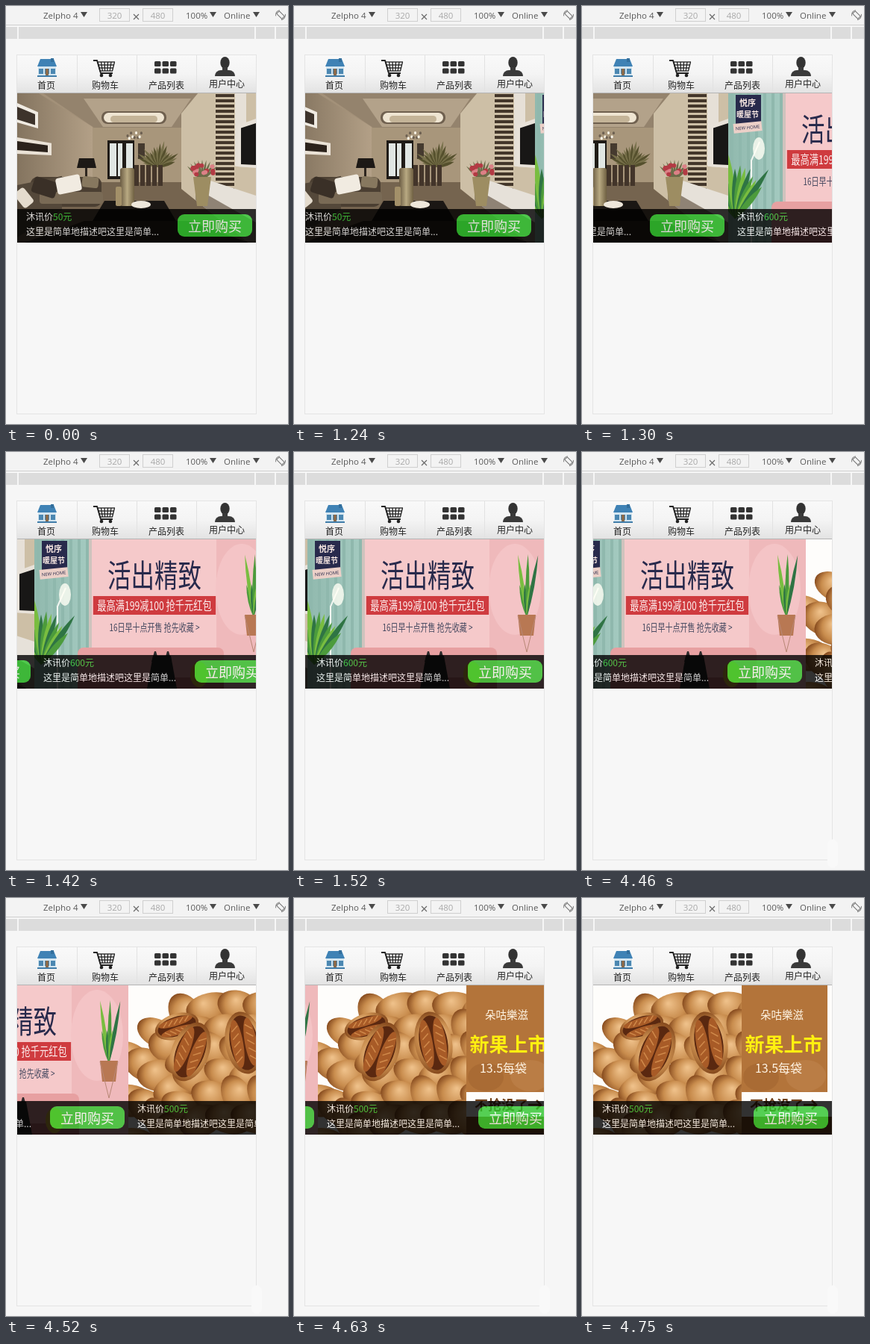
These frames come from a looping animation (378 px wide and 560 px high, 5.29 s). An HTML page with a canvas:

```html
<!DOCTYPE html>
<html lang="zh">
<head>
<meta charset="utf-8">
<title>Shop carousel</title>
<style>
html, body { margin: 0; width: 100%; height: 100%; overflow: hidden; background: #f6f6f6; }
body { position: relative; font: 12px/20px "Noto Sans CJK SC", "Noto Sans CJK", sans-serif; }
#page { position: absolute; left: 0; top: 0; }
#view { position: absolute; left: 15px; top: 117px; width: 320px; height: 200px; overflow: hidden; }
#strip { position: absolute; left: 0; top: 0; width: 960px; height: 200px; }
#strip canvas { position: absolute; left: 0; top: 0; }
.cap { position: absolute; top: 155px; width: 320px; height: 45px; background: #000; color: #fff; opacity: .8; white-space: nowrap; }
.cap p { margin: 0 0 0 12px; height: 20px; }
.cap b { font-weight: 400; color: #32cd32; }
.cap span { position: absolute; left: 215px; top: 7px; width: 100px; height: 30px; border-radius: 9px; background: #2bc42b; font-size: 18px; line-height: 30px; text-align: center; }
#glow { position: absolute; left: 329px; top: 519px; width: 14px; height: 38px; border-radius: 7px; background: #f9f9f9; opacity: 0; }
</style>
</head>
<body>
<canvas id="page" width="378" height="560"></canvas>
<div id="view"><div id="strip"><canvas id="art" width="960" height="200"></canvas></div></div>
<div id="glow"></div>
<script>
const $ = id => document.getElementById(id);
const CJK = '"Noto Sans CJK SC", "Noto Sans CJK", sans-serif';
const UI = '"Open Sans", sans-serif';
let c;

function rect(x, y, w, h, fill) {
  c.fillStyle = fill;
  c.fillRect(x, y, w, h);
}
function round(x, y, w, h, r, fill) {
  c.beginPath();
  c.roundRect(x, y, w, h, r);
  c.fillStyle = fill;
  c.fill();
}
function oval(x, y, rx, ry, fill) {
  c.beginPath();
  c.ellipse(x, y, rx, ry, 0, 0, 7);
  c.fillStyle = fill;
  c.fill();
}
function line(color, width, ...p) {
  c.beginPath();
  for (let i = 0; i < p.length; i += 2) c.lineTo(p[i], p[i + 1]);
  c.strokeStyle = color;
  c.lineWidth = width;
  c.stroke();
}
// symmetric trapezoid around x, with half widths at top and bottom
function taper(x, y, h, top, bottom, fill) {
  c.beginPath();
  c.moveTo(x - top, y);
  c.lineTo(x + top, y);
  c.lineTo(x + bottom, y + h);
  c.lineTo(x - bottom, y + h);
  c.fillStyle = fill;
  c.fill();
}
function leaf(x, y, length, angle, w, fill) {
  at(x, y, angle, () => {
    c.beginPath();
    c.moveTo(0, 0);
    c.quadraticCurveTo(w, -length / 2, 0, -length);
    c.quadraticCurveTo(-w, -length / 2, 0, 0);
    c.fillStyle = fill;
    c.fill();
  });
}
function at(x, y, turn, draw) {
  c.save();
  c.translate(x, y);
  c.rotate(turn);
  draw();
  c.restore();
}
function fade(x0, y0, x1, y1, ...colors) {
  const g = c.createLinearGradient(x0, y0, x1, y1);
  colors.forEach((k, i) => g.addColorStop(i / (colors.length - 1), k));
  return g;
}
function text(s, x, y, font, fill, align = 'center') {
  c.font = font;
  c.textAlign = align;
  c.fillStyle = fill;
  c.fillText(s, x, y);
}
function repeat(n, draw) {
  for (let i = 0; i < n; i++) draw(i);
}
function seeded(seed) {
  return () => (seed = seed * 16807 % 2147483647) / 2147483647;
}

function drawToolbar() {
  const font = '11.5px ' + UI, ink = '#5a5a5a';
  rect(0, 0, 378, 560, '#f6f6f6');
  rect(0, 0, 378, 25, '#f3f3f3');
  rect(0, 25, 378, 1, '#cdcdcd');
  rect(0, 28, 378, 16, '#dcdcdc');
  for (const x of [15, 333, 360]) rect(x, 28, 2, 16, '#f6f6f6');
  const menu = (s, x, arrow) => {
    text(s, x, 17, font, ink, 'left');
    taper(arrow + 4.5, 8, 7, 4.5, 0, '#4a4a4a');
  };
  menu('Zelpho 4', 50, 100);
  menu('100%', 241, 273);
  menu('Online', 292, 331);
  const field = (s, x) => {
    c.strokeStyle = '#cfcfcf';
    c.strokeRect(x + .5, 3.5, 40, 17);
    text(s, x + 20.5, 17, font, '#a9a9a9');
  };
  field('320', 125);
  field('480', 183);
  for (const s of [-1, 1]) line('#666', 1.1, 174.5 - 3.5 * s, 11, 174.5 + 3.5 * s, 18);
  at(368, 12, -Math.PI / 4, () => {
    c.strokeStyle = '#777';
    c.lineWidth = 1;
    c.strokeRect(-2.5, -5, 5, 10);
    c.beginPath();
    c.arc(0, 0, 6.5, .6, 2.2);
    c.moveTo(-5.4, -3.7);
    c.arc(0, 0, 6.5, 3.75, 5.3);
    c.stroke();
  });
}

function drawHouse() {
  rect(43, 79, 24, 16, '#d3e5f0');
  taper(55, 71, 10, 9, 13, '#3f82b5');
  rect(60, 70, 4, 5, '#336f9c');
  repeat(3, i => rect(44 + i * 8, 84, 6, 7, '#4b87b1'));
  rect(53, 84, 4, 11, '#8a6a4c');
  rect(42, 93, 26, 2, '#417da9');
}
function drawCart() {
  line('#222', 1.8, 117, 73, 122, 73, 127, 90, 143, 90);
  repeat(4, i => line('#222', 1.3, 122 + i, 75 + i * 4, 146 - i, 75 + i * 4));
  repeat(6, i => line('#222', 1.3, 123 + i * 4.5, 75, 126 + i * 3.3, 87));
  for (const x of [128, 140]) oval(x, 93, 2.3, 2.3, '#222');
}
function drawUser() {
  oval(293.5, 76, 6.2, 8, '#333');
  rect(290, 82, 7, 6, '#3a3a3a');
  round(280, 86, 27, 8, [9, 9, 0, 0], '#3a3a3a');
}
function drawPhone() {
  rect(14, 65, 322, 482, '#e4e4e4');
  rect(15, 66, 320, 480, '#f7f7f7');
  rect(15, 66, 320, 50, fade(0, 66, 0, 116, '#f9f9f9', '#f4f4f4', '#e3e3e3'));
  repeat(3, i => rect(95 + i * 80, 66, 1, 50, '#e2e2e2'));
  rect(15, 116, 320, 1, '#b4b4b4');
  drawHouse();
  drawCart();
  repeat(6, i => round(199 + i % 3 * 10.5, 74 + (i > 2) * 9.5, 8.5, 7, 1.5, '#333'));
  drawUser();
  const label = (s, x, y = 111) => text(s, x, y, '12px ' + CJK, '#222');
  label('首页', 54);
  label('购物车', 133);
  label('产品列表', 215);
  label('用户中心', 296, 109);
}

// panel on a side wall: heights are given at the picture's edge and shrink towards the vanishing point
function wall(x0, x1, top, bottom, fill) {
  const vx = 185, vy = 205, edge = x0 < vx ? 15 : 335;
  const y = (h, x) => vy + (h - vy) * (x - vx) / (edge - vx);
  c.beginPath();
  c.moveTo(x0, y(top, x0));
  c.lineTo(x1, y(top, x1));
  c.lineTo(x1, y(bottom, x1));
  c.lineTo(x0, y(bottom, x0));
  c.fillStyle = fill;
  c.fill();
}
function pillow(x, y, size, turn, fill) {
  at(x, y, turn, () => round(-size / 2, -size / 3, size, size / 1.5, 4, fill));
}
function drawRoom() {
  const rnd = seeded(5);
  rect(0, 117, 350, 200, '#a39179');
  // ceiling with its lit recess, floor and walls
  taper(180, 117, 46, 130, 62, '#94836d');
  taper(176, 124, 38, 72, 46, '#b3a28a');
  round(128, 141, 87, 17, 8, '#6f604f');
  round(131, 143, 81, 13, 7, '#efe5d2');
  round(140, 147, 63, 9, 5, '#c4b498');
  rect(116, 163, 120, 76, '#a8967b');
  taper(180, 236, 81, 70, 190, '#75644f');
  wall(15, 116, 99, 284, fade(15, 0, 116, 0, '#84745f', '#b3a087'));
  wall(235, 335, 22, 325, '#cdbfa6');
  // wall pictures and television
  wall(15, 43, 130, 156, '#f0ebe2');
  wall(15, 39, 135, 152, '#3d332b');
  wall(15, 61, 176, 198, '#eae2d6');
  wall(15, 56, 181, 193, '#2b221b');
  repeat(19, i => rect(281, 118 + i * 7, 25, 4, '#43362a'));
  wall(307, 322, 60, 217, '#e6e0d7');
  wall(311, 335, 151, 217, '#e8e2d9');
  wall(315, 335, 157, 213, '#181716');
  wall(254, 335, 270, 325, '#8f8375');
  wall(258, 335, 254, 290, '#e6e1d9');
  // glass door and picture at the back
  rect(136, 180, 36, 52, '#1f1b17');
  repeat(3, i => rect(139 + i * 11, 184, 9 - i % 2 * 3, 44, '#e0e6e3'));
  rect(177, 184, 9, 21, '#453a2f');
  repeat(9, i => oval(163 + i * 2.3, 174 + 4 * Math.sin(i * 2.2), 1.6, 2, i % 2 ? '#f8f3e6' : '#6d6051'));
  // plant and dining chairs
  repeat(18, i => leaf(205, 216, 22 + 15 * rnd(), -1.3 + i * .15, 4, i % 2 ? '#55502d' : '#77704a'));
  repeat(5, i => rect(172 + i * 8, 213, 6, 28, '#43352a'));
  // flowers in a vase
  repeat(9, i => leaf(263, 234, 28, -.8 + i * .2, 3, '#6c6b48'));
  repeat(15, i => oval(248 + 31 * rnd(), 209 + 18 * rnd(), 3.1, 2.8, i % 3 ? '#b33a44' : '#dc8086'));
  taper(263, 229, 39, 12, 7, '#9d8d62');
  // lamp and sofa
  taper(108, 204, 13, 10, 13, '#1d1916');
  rect(106, 217, 3, 12, '#2e261f');
  round(33, 229, 95, 40, 9, '#4b3f32');
  wall(15, 75, 240, 310, '#54483a');
  round(45, 249, 85, 16, 4, '#796a55');
  pillow(52, 243, 33, .3, '#3a3027');
  pillow(113, 236, 22, .1, '#87785f');
  pillow(84, 239, 33, -.2, '#f1ebe1');
  pillow(24, 257, 25, .9, '#e4dbcd');
  // glass jars on the low table
  taper(172, 261, 27, 40, 56, '#1b1714');
  round(153, 217, 19, 51, 3, fade(153, 0, 172, 0, '#6b5c43', '#b8a982', '#6f6042'));
  round(147, 242, 8, 26, 2, '#a39069');
  oval(181, 266, 13, 5, '#eee7db');
  taper(175, 288, 29, 70, 150, '#352a20');
}

function drawHome() {
  const rnd = seeded(11), navy = '#282a4c';
  const greens = ['#4c9b3c', '#79bd40', '#2f7444'];
  rect(0, 117, 350, 200, '#f5c9ca');
  rect(259, 117, 76, 200, '#efb9bb');
  oval(293, 184, 35, 61, '#f4c4c6');
  rect(15, 117, 77, 200, fade(15, 0, 92, 0, '#91b9ae', '#a5cbc1'));
  repeat(7, i => rect(18 + i * 11, 117, 4, 200, '#8fb8ad'));
  rect(88, 117, 4, 200, '#cfc3bd');
  // lamp and left plant
  line('#f2f6f1', 2, 46, 317, 46, 207, 57, 182);
  oval(56, 191, 8, 15, 'rgba(255,255,245,.8)');
  repeat(13, i => leaf(24, 285, 50 + 42 * rnd(), -.5 + i * .1, 8, greens[i % 3]));
  // badge
  rect(25, 119, 34, 44, navy);
  text('悦序', 41, 134, 'bold 11px ' + CJK, '#f8e8e3');
  text('暖屋节', 41, 149, 'bold 10px ' + CJK, '#f8e8e3');
  at(41, 162, -.1, () => {
    rect(-19, -6, 38, 13, '#ecd0c8');
    text('NEW HOME', 0, 3, '6px ' + UI, navy);
  });
  // sofa, cushion and cat
  round(73, 262, 196, 65, 8, '#e7a0a1');
  rect(73, 302, 196, 15, '#c86f74');
  oval(236, 298, 12, 17, '#e4bf3f');
  for (const x of [177, 194]) taper(x, 267, 14, 1, 5, '#2d2a2b');
  taper(186, 273, 44, 12, 20, '#2d2a2b');
  // the banner photo is squeezed to the slide's width
  c.save();
  c.translate(176, 0);
  c.scale(.74, 1);
  text('活出精致', 0, 181, '500 42.5px ' + CJK, navy);
  rect(-111, 193, 222, 25, '#cf3b3f');
  text('最高满199减100 抢千元红包', 0, 212, '500 16.5px ' + CJK, '#fdeeee');
  text('16日早十点开售 抢先收藏 >', 0, 240, '13.5px ' + CJK, '#474a61');
  c.restore();
  // hanging plant
  repeat(6, i => leaf(309, 222, 45 + 40 * (i % 2), -.22 + i * .08, 5, greens[i % 3]));
  taper(309, 218, 28, 12, 9, '#b87853');
  line('#b88776', 1, 297, 219, 309, 268, 321, 219);
}

function nut(x, y, rx, ry, turn, open) {
  at(x, y, turn, () => {
    const g = c.createRadialGradient(-rx * .25, -ry * .35, 1, 0, 0, rx);
    g.addColorStop(0, '#eec089');
    g.addColorStop(.55, '#c88c4d');
    g.addColorStop(1, '#84481c');
    oval(0, 0, rx, ry, g);
    line('#5b2c10', 1);
    if (!open) return;
    oval(0, 0, rx * .88, ry * .76, '#5a2810');
    for (const s of [-1, 1]) {
      oval(0, s * ry * .36, rx * .78, ry * .32, '#a85b27');
      repeat(5, i => line('#d08a4b', 1.5, (i - 2) * rx * .25 - 3, s * ry * .2, (i - 2) * rx * .25 + 4, s * ry * .55));
    }
  });
}
function drawNuts() {
  const rnd = seeded(23), brown = '#b3743a', ink = '#70421c';
  const crest = x => 126 + 68 * (Math.max(0, 125 - x) / 110) ** 1.5;
  rect(0, 117, 350, 200, '#fefdfb');
  // the heap: staggered rows that follow its crest
  repeat(6, row => {
    repeat(7, i => {
      const x = 16 + i * 36 + row % 2 * 18 + 8 * rnd();
      nut(x, crest(x) + 20 + row * 30, 29 + 5 * rnd(), 18 + 4 * rnd(), 1.6 * rnd() - .5, false);
    });
  });
  nut(80, 172, 30, 17, -.3, true);
  nut(98, 206, 41, 25, -1.2, true);
  nut(170, 194, 42, 25, 1.4, true);
  // offer panel
  rect(214, 117, 121, 176, '#fefdfb');
  rect(214, 117, 115, 143, brown);
  oval(300, 238, 27, 21, '#ba7d45');
  oval(240, 240, 24, 19, '#a96b34');
  rect(214, 293, 121, 24, '#8a5224');
  text('朵咕樂滋', 268, 162, '500 14.5px ' + CJK, '#fff6e6');
  text('新果上市', 270.5, 206, '900 26px ' + CJK, '#fff010');
  text('13.5每袋', 263.5, 234, '500 16px ' + CJK, '#fff4e4');
  text('不抢没了', 261, 284, 'bold 18px ' + CJK, ink);
  line(ink, 2.5, 297, 277, 314, 277);
  line(ink, 2.5, 308, 271, 314, 277, 308, 283);
}

c = $('page').getContext('2d');
drawToolbar();
drawPhone();

c = $('art').getContext('2d');
[drawRoom, drawHome, drawNuts].forEach((draw, i) => {
  c.save();
  c.beginPath();
  c.rect(i * 320, 0, 320, 200);
  c.clip();
  c.translate(i * 320 - 15, -117);
  draw();
  c.restore();
});
[50, 600, 500].forEach((price, i) => $('strip').insertAdjacentHTML('beforeend',
  `<div class="cap" style="left:${i * 320}px"><p>沐讯价<b>${price}元</b></p>` +
  '<p>这里是简单地描述吧这里是简单...</p><span>立即购买</span></div>'));

// cubic-bezier(.25, .1, .25, 1)
function ease(x) {
  if (x <= 0 || x >= 1) return x <= 0 ? 0 : 1;
  const curve = (s, a, b) => 3 * (1 - s) ** 2 * s * a + 3 * (1 - s) * s * s * b + s ** 3;
  let lo = 0, hi = 1;
  repeat(20, () => {
    const mid = (lo + hi) / 2;
    if (curve(mid, .25, .25) < x) lo = mid; else hi = mid;
  });
  return curve(lo, .1, 1);
}

const LOOP = 5290;
// the screen refreshes in steps from `first`; the slide itself began `lead` earlier
function slide(t, first, step, lead, span) {
  if (t < first) return 0;
  const shown = Math.floor((t - first) / step) * step;
  return ease((shown + lead) / span);
}

const born = performance.now();
function render() {
  const t = (performance.now() - born) % LOOP;
  const x = 320 * (slide(t, 1240, 60, 16, 290) + slide(t, 4460, 56.6, 31, 282));
  $('strip').style.transform = `translateX(${-Math.round(x)}px)`;
  $('glow').style.opacity = Math.min(5, Math.max(0, Math.floor((t - 2510) / 67.5) + 1)) / 5;
  requestAnimationFrame(render);
}
render();
</script>
</body>
</html>
```
